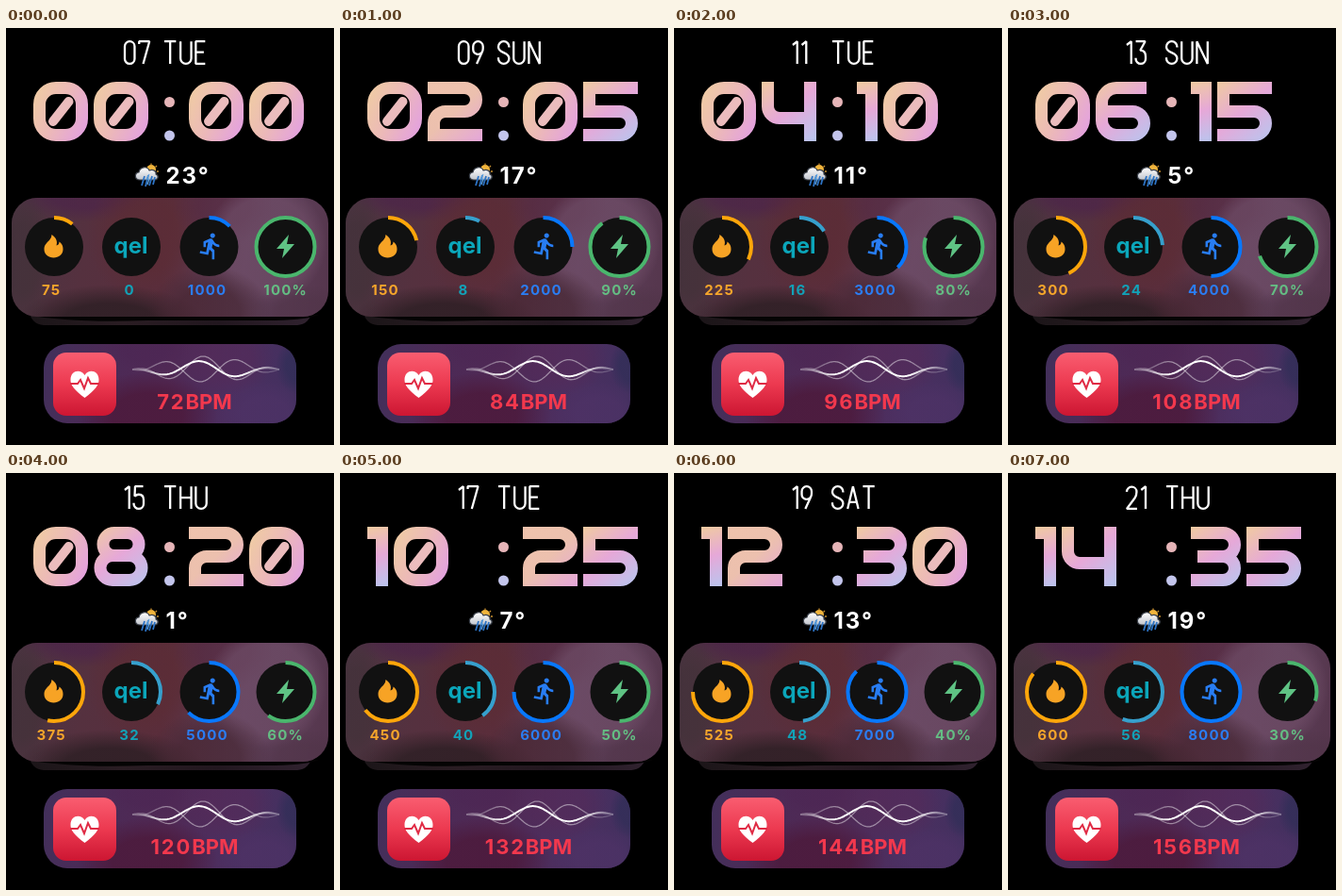
Animation of 348 by 442 pixels, one loop 8 s. Source, as an HTML page with a canvas:

```html
<!DOCTYPE html>
<html lang="en">
<head>
<meta charset="utf-8">
<title>Watch face</title>
<style>
html, body { margin: 0; width: 100%; height: 100%; overflow: hidden; background: #000; }
canvas { display: block; width: 348px; height: 442px; }
</style>
</head>
<body>
<canvas id="face" width="348" height="442"></canvas>
<script>
const ctx = document.getElementById('face').getContext('2d');
const STEP = 1000, STEPS = 8;
const FONT = 'Inter, "Open Sans", sans-serif';
const pad = n => String(n).padStart(2, '0');

// Heavy clock digits: [width, centre line], 63 px tall with a 13 px stroke.
const CLOCK = {
  0: [58, 'M24 6.5H34A17.5 17.5 0 0 1 51.5 24V39A17.5 17.5 0 0 1 34 56.5H24A17.5 17.5 0 0 1 6.5 39V24A17.5 17.5 0 0 1 24 6.5Z'],
  1: [22, 'M0 6.5H15.5V63'],
  2: [58, 'M0 6.5H39A12.5 12.5 0 0 1 39 31.5H19A12.5 12.5 0 0 0 6.5 44V56.5H58'],
  3: [53, 'M0 6.5H34A12.5 12.5 0 0 1 34 31.5H7M34 31.5A12.5 12.5 0 0 1 34 56.5H0'],
  4: [58, 'M6.5 0V26A12.5 12.5 0 0 0 19 38.5H51.5M51.5 0V63'],
  5: [58, 'M58 6.5H6.5V31.5H39A12.5 12.5 0 0 1 39 56.5H0'],
  6: [58, 'M54 6.5H22A15.5 15.5 0 0 0 6.5 22V41A15.5 15.5 0 0 0 22 56.5H39A12.5 12.5 0 0 0 39 31.5H6.5'],
  8: [58, 'M22 6.5H36A12 12 0 0 1 36 30.5H22A12 12 0 0 1 22 6.5ZM20 30.5H38A13 13 0 0 1 38 56.5H20A13 13 0 0 1 20 30.5Z']
};

// Thin condensed lettering for the date, 25 units tall centre lines.
const THIN = {
  0: [11, 'M0 5.5a5.5 5.5 0 0 1 11 0v14a5.5 5.5 0 0 1-11 0z'],
  1: [5, 'M0 4L5 0v25'],
  2: [11, 'M0 6a5.5 5.5 0 0 1 11 0q0 4-2 7L0 25h11.5'],
  3: [11, 'M0 0h10.5L5 10q6 0 6 7v2.5a5.5 5.5 0 0 1-11 0v-1'],
  5: [11, 'M10.5 0h-9L1 11q2-2 4.5-2 5.5 0 5.5 6v4.5a5.5 5.5 0 0 1-11 0v-1'],
  7: [11.5, 'M0 3V0h11.5L4.5 25'],
  9: [11, 'M11 8V5.5a5.5 5.5 0 0 0-11 0v3.5a5.5 5.5 0 0 0 10 3L4 25M11 8q0 2-1 4'],
  T: [13, 'M0 0h13M6.5 0v25'],
  U: [12, 'M0 0v19a6 6 0 0 0 12 0V0'],
  E: [10.5, 'M10.5 0H0v25h10.5M0 12h9'],
  S: [12, 'M12 6.5V6a6 6 0 0 0-12 0c0 8 12 5 12 13a6 6 0 0 1-12 0v-1'],
  N: [12, 'M0 25V0L12 25V0'],
  H: [12, 'M0 0v25M12 0v25M0 12.5h12'],
  A: [12, 'M0 25L6 0l6 25M2 17.5h8']
};

const RUNNER = 'M13.5 5.5c1.1 0 2-.9 2-2s-.9-2-2-2-2 .9-2 2 .9 2 2 2zM9.9 19.4l1-4.4 2.1 2v6h2v-7.5l-2.1-2 .6-3c1.3 1.5 3.3 2.5 5.5 2.5v-2c-1.9 0-3.5-1-4.3-2.4l-1-1.6c-.4-.6-1-1-1.7-1-.3 0-.5.1-.8.1L6 8.3V13h2V9.6l1.8-.7-1.6 8.1-4.9-1-.4 2z';

function gradient(x0, y0, x1, y1, ...colors) {
  const g = ctx.createLinearGradient(x0, y0, x1, y1);
  colors.forEach((c, i) => g.addColorStop(i / (colors.length - 1), c));
  return g;
}

function box(x, y, w, h, r, fill) {
  ctx.beginPath();
  ctx.roundRect(x, y, w, h, r);
  ctx.fillStyle = fill;
  ctx.fill();
}

function disc(x, y, r, fill) {
  ctx.beginPath();
  ctx.arc(x, y, r, 0, 7);
  ctx.fillStyle = fill;
  ctx.fill();
}

function shape(d, x, y, fill, scale = 1) {
  ctx.save();
  ctx.translate(x, y);
  ctx.scale(scale, scale);
  ctx.fillStyle = fill;
  ctx.fill(new Path2D(d));
  ctx.restore();
}

function line(d, x, y, color, width, scale = 1) {
  ctx.save();
  ctx.translate(x, y);
  ctx.scale(scale, scale);
  ctx.strokeStyle = color;
  ctx.lineWidth = width;
  ctx.stroke(new Path2D(d));
  ctx.restore();
}

function text(s, x, y, size, color, spacing = 0, align = 'left') {
  ctx.font = `700 ${size}px ${FONT}`;
  ctx.letterSpacing = spacing + 'px';
  ctx.textAlign = align;
  ctx.fillStyle = color;
  ctx.fillText(s, x, y);
}

function blob(x, y, rx, ry, rgb, alpha, core = 0.5) {
  ctx.save();
  ctx.translate(x, y);
  ctx.scale(rx, ry);
  const g = ctx.createRadialGradient(0, 0, core, 0, 0, 1);
  g.addColorStop(0, `rgba(${rgb},${alpha})`);
  g.addColorStop(1, `rgba(${rgb},0)`);
  disc(0, 0, 1, g);
  ctx.restore();
}

function clipped(x, y, w, h, r, draw) {
  ctx.save();
  ctx.beginPath();
  ctx.roundRect(x, y, w, h, r);
  ctx.clip();
  draw();
  ctx.restore();
}

function thinText(s, x) {
  const scale = 0.95;
  ctx.lineJoin = 'bevel';
  for (const ch of s) {
    const [w, d] = THIN[ch];
    line(d, x, 14.2, '#fff', 2.4, scale);
    x += w * scale + 4.8;
  }
  ctx.lineJoin = 'miter';
}

function digitFill(ch, w) {
  if (ch === '0') return gradient(0, 14, 58, 42, '#efcba4', '#ecb9b8', '#e4a3dc');
  if (ch === '2') return gradient(0, 0, 58, 63, '#efc3ac', '#ecc0ae', '#e4a6da');
  return gradient(0, 0, w * 0.9, 63, '#f0cba0', '#e6a8d8', '#bbc4ee');
}

function clockPair(n, x) {
  for (const ch of pad(n)) {
    const [w, d] = CLOCK[ch];
    line(d, x, 57, digitFill(ch, w), 13);
    if (ch === '0') {
      ctx.lineCap = 'round';
      line('M21 42L37.5 21', x, 57, '#ebbcbd', 10);
      ctx.lineCap = 'butt';
    }
    x += w + 6;
  }
}

function weather() {
  ctx.lineJoin = 'round';
  disc(154, 150, 5, '#f0b43c');
  line('M154 143.5v2M160 146l-1.5 1.5M162 152h-2', 0, 0, '#c9902f', 1.3);
  const cloud = 'M142 161C136 161 136 153 141 153C142 147 150 146 152 151C156 149 160 152 159 155C163 157 161 161 157 161Z';
  shape(cloud, 0, 0, gradient(0, 148, 0, 161, '#fff', '#c0c4cc'));
  line(cloud, 0, 0, '#3b404a', 1.2);
  line('M147 157l-3 10M151 156l-3 12M155 157l-3 10M158 158l-2 8', 0, 0, '#2d73c4', 1.8);
  line('M152 155l-3 5h3l-2 6', 0, 0, '#5fa4e0', 1.2);
  ctx.lineJoin = 'miter';
}

function mainCard() {
  box(25, 285, 299, 30, 16, gradient(25, 0, 324, 0, '#1b1518', '#2a1d23', '#22171f', '#30222f'));
  shape('M22 304H332Q322 309 285 310H150Q70 313 22 304Z', 0, 0, '#050404');
  clipped(6, 180, 336, 126, 27, () => {
    box(6, 180, 336, 126, 0, gradient(6, 180, 342, 235, '#4b3442', '#55313f', '#592e3e', '#634560', '#56374e'));
    blob(85, 176, 75, 30, '76,36,74', 0.7);
    blob(150, 220, 64, 72, '92,44,52', 0.7);
    blob(232, 188, 55, 42, '84,40,64', 0.6);
    blob(276, 228, 64, 64, '110,76,102', 0.7, 0.75);
    blob(110, 312, 100, 40, '40,29,33', 0.75);
    blob(215, 300, 65, 48, '70,38,50', 0.7);
    blob(316, 304, 60, 32, '80,52,72', 0.6);
    blob(18, 245, 34, 72, '64,49,55', 0.6);
  });
}

function gauge(x, part, ring, label, labelX, labelColor) {
  disc(x, 232, 31, '#111');
  if (part > 0) {
    ctx.beginPath();
    ctx.arc(x, 232, 31, -Math.PI / 2, (part * 2 - 0.5) * Math.PI);
    ctx.strokeStyle = ring;
    ctx.lineWidth = 4;
    ctx.stroke();
  }
  text(label, labelX + 0.6, 283, 15, labelColor, 1.2, 'center');
}

function icons() {
  shape('M48.5 219C53 222 55 226 53.5 230.5Q56.5 230 56.5 226.5C60 229 60.5 232 60.5 234.5C60.5 240 56 243.5 50.5 243.5C45 243.5 40.5 240 40.5 234.5C40.5 230 43 228 46 225Q48.5 222.5 48.5 219Z', 0, 0, '#f7a325');
  text('qel', 132.5, 238.5, 24, '#0ba6ba', 0, 'center');
  shape(RUNNER, 201.8, 215.5, '#287df4', 1.29);
  shape('M300 219L287 234H295L293 244L306 229H298Z', 0, 0, '#5fc384');
}

function wave(amp, cycles, center, alpha, width) {
  ctx.beginPath();
  for (let x = 134; x <= 290; x++) {
    const t = (x - 134) / 156;
    ctx.lineTo(x, 362 - amp * Math.sin(Math.PI * t) * Math.cos(2 * Math.PI * cycles * (t - center)));
  }
  const white = a => `rgba(255,255,255,${a})`;
  ctx.strokeStyle = gradient(134, 0, 290, 0, white(0.15), white(alpha), white(alpha), white(alpha), white(0.15));
  ctx.lineWidth = width;
  ctx.stroke();
}

function heartCard(bpm) {
  clipped(40, 335, 268, 84, 25, () => {
    box(40, 335, 268, 84, 0, gradient(40, 335, 308, 390, '#42305b', '#4c2a56', '#502955', '#4c2f60', '#42305f'));
    blob(150, 410, 75, 45, '76,25,58', 0.8);
    blob(150, 338, 45, 26, '76,38,84', 0.6);
    blob(235, 350, 50, 40, '84,42,88', 0.6);
    blob(308, 358, 22, 30, '50,46,88', 0.8);
    blob(275, 408, 48, 34, '78,50,102', 0.7);
  });
  box(50, 344, 67, 67, 14, gradient(0, 344, 0, 411, '#f95d70', '#ec3950', '#cc1632'));
  shape('M83.5 392C73 384 68.5 379 68.5 373C68.5 363 79 361 83.5 368C88 361 98.5 363 98.5 373C98.5 379 94 384 83.5 392Z', 0, 0, '#fff');
  line('M68 377h8l3-4 4 9 4-11 3 6h9', 0, 0, '#e02b45', 2);
  wave(14, 2, 0.48, 0.45, 1.3);
  wave(-13, 2, 0.46, 0.45, 1.3);
  wave(9, 1.9, 0.45, 1, 2);

  const red = '#f2384d', digits = String(bpm);
  ctx.font = `700 22px ${FONT}`;
  ctx.letterSpacing = '1.8px';
  const numberWidth = ctx.measureText(digits).width;
  ctx.letterSpacing = '0px';
  const left = 200 - (numberWidth + ctx.measureText('BPM').width) / 2;
  text(digits, left, 404, 22, red, 1.8);
  text('BPM', left + numberWidth, 404, 22, red);
}

function draw(i) {
  ctx.fillStyle = '#000';
  ctx.fillRect(0, 0, 348, 442);

  const day = 7 + 2 * i;
  const weekday = new Date(2025, i, day).getDay();
  thinText(pad(day), 126);
  thinText(['SUN', 'MON', 'TUE', 'WED', 'THU', 'FRI', 'SAT'][weekday], 168);

  clockPair(2 * i, 29);
  disc(173.5, 78.5, 5.5, '#e6b5b8');
  disc(173.5, 114, 5.5, '#c3c5ec');
  clockPair(5 * i, 194);

  weather();
  text(Math.abs(23 - 6 * i) + '°', 169.5, 165, 24, '#fff', 1.9);

  mainCard();
  const energy = 75 * (i + 1), score = 8 * i, steps = 1000 * (i + 1), battery = 100 - 10 * i;
  gauge(51, energy / 700, '#ffa60a', energy, 47.5, '#f5a52b');
  gauge(133, score / 100, '#36a0cd', score, 130.5, '#12a2b8');
  gauge(215.5, steps / 8000, '#0878ff', steps, 213, '#2b7df3');
  gauge(296.5, battery / 100, '#4ab66d', battery + '%', 296, '#64bd83');
  icons();

  heartCard(72 + 12 * i);
}

let start, shown = -1;
function tick(now) {
  start ??= now;
  const i = Math.floor((now - start) / STEP) % STEPS;
  if (i !== shown) draw(shown = i);
  requestAnimationFrame(tick);
}
draw(0);
requestAnimationFrame(tick);
</script>
</body>
</html>
```
